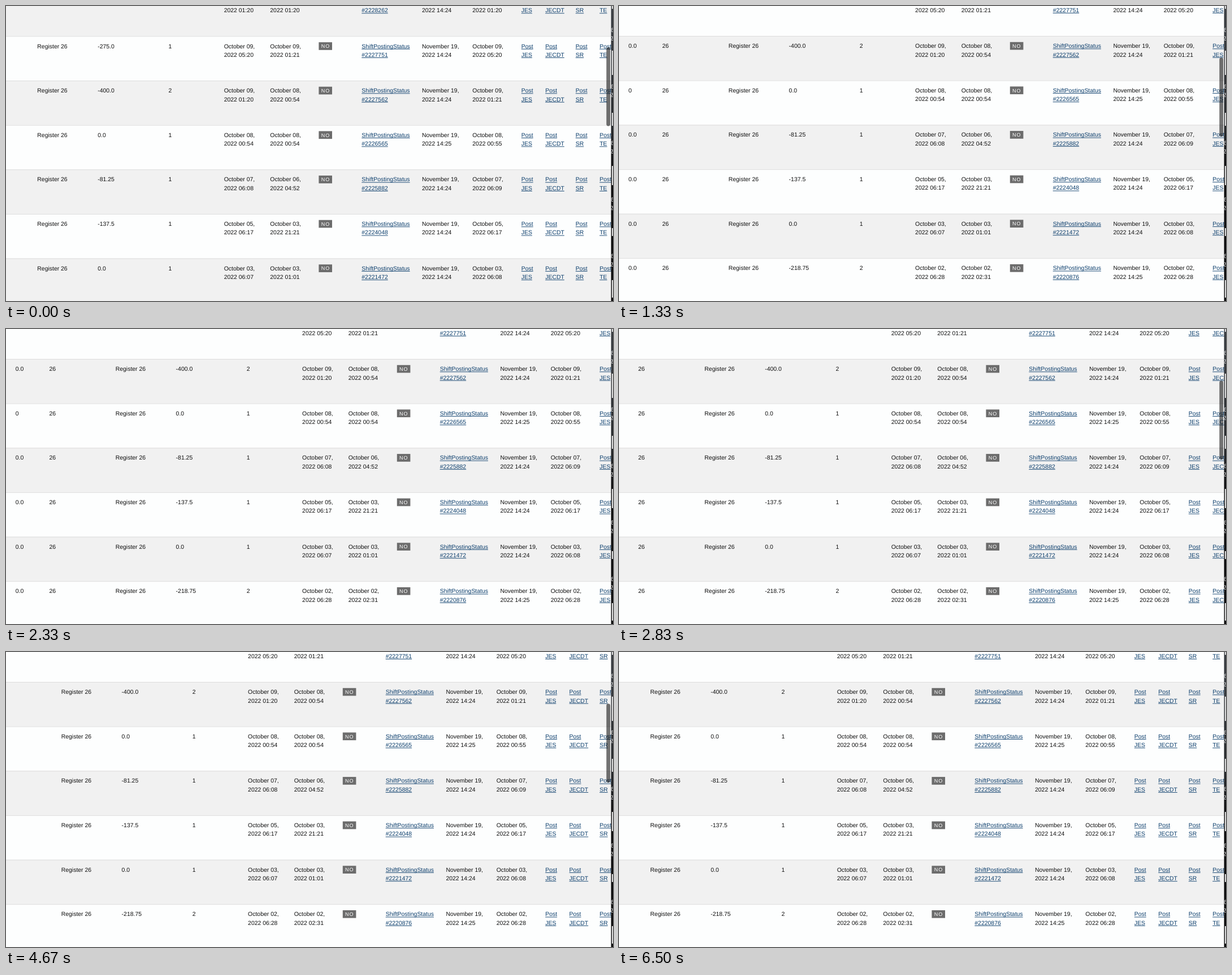
Write an HTML page with a canvas that moves like this. It is 1074 px wide and 522 px high and loops after 6.67 s.

```html
<!DOCTYPE html>
<html lang="en">
<head>
<meta charset="utf-8">
<title>Shift table</title>
<style>
  html, body { margin: 0; width: 100%; height: 100%; overflow: hidden; background: #fdfefe; }
  canvas { display: block; }
</style>
</head>
<body>
<canvas id="stage"></canvas>
<script>
const WIDTH = 1074, HEIGHT = 522, LOOP = 6670;
const ROW_HEIGHT = 78.64, FIRST_TOP = -24.6;
const FIRST_BASELINE = 20.5, LINE_HEIGHT = 15.35;
const FONT = '"Liberation Sans", Arial, sans-serif';
const INK = '#101010', LINK = '#0d3f6d';
const canvas = document.getElementById('stage');
const ratio = window.devicePixelRatio || 1;
canvas.width = WIDTH * ratio;
canvas.height = HEIGHT * ratio;
canvas.style.width = WIDTH + 'px';
canvas.style.height = HEIGHT + 'px';
const ctx = canvas.getContext('2d');
ctx.scale(ratio, ratio);

// difference | amount | count | start | end | status id | posted | updated
const rows = `
0.0|0.0|1|09, 01:20|09, 01:20|2228262|24|09, 01:20
0.0|-275.0|1|09, 05:20|09, 01:21|2227751|24|09, 05:20
0.0|-400.0|2|09, 01:20|08, 00:54|2227562|24|09, 01:21
0|0.0|1|08, 00:54|08, 00:54|2226565|25|08, 00:55
0.0|-81.25|1|07, 06:08|06, 04:52|2225882|24|07, 06:09
0.0|-137.5|1|05, 06:17|03, 21:21|2224048|24|05, 06:17
0.0|0.0|1|03, 06:07|03, 01:01|2221472|24|03, 06:08
0.0|-218.75|2|02, 06:28|02, 02:31|2220876|25|02, 06:28
`.trim().split('\n').map(line => line.split('|'));

// Each focus change scrolls the table at once and shows the scrollbar.
const views = [
  { start: 0, shift: 0, scroll: 0 },
  { start: 1330, shift: 138.4, scroll: 79 },
  { start: 2670, shift: 96, scroll: 79 },
  { start: 4330, shift: 42.4, scroll: 79 },
  { start: 5670, shift: 0, scroll: 79 }
];

function rect(x, y, w, h, color) {
  ctx.fillStyle = color;
  ctx.fillRect(x, y, w, h);
}

function text(value, x, y, color = INK, size = 10.45) {
  ctx.font = `${size}px ${FONT}`;
  ctx.fillStyle = color;
  ctx.fillText(value, x, y);
}

function cell(x, top, ...lines) {
  lines.forEach((line, i) => text(line, x, top + FIRST_BASELINE + i * LINE_HEIGHT));
}

function link(x, top, ...lines) {
  lines.forEach((line, i) => {
    const y = top + FIRST_BASELINE + i * LINE_HEIGHT;
    text(line, x, y, LINK);
    rect(x, y + 1.2, ctx.measureText(line).width, 0.9, LINK);
  });
}

function date(x, top, value) {
  const [day, time] = value.split(' ');
  cell(x, top, 'October ' + day, '2022 ' + time);
}

function badge(x, top) {
  rect(x, top + 10.1, 23.6, 13.7, '#6c6c6c');
  ctx.letterSpacing = '1px';
  text('NO', x + 4.3, top + 20.2, '#fff', 9);
  ctx.letterSpacing = '0px';
}

function drawRow(row, index, shift, scroll) {
  const [difference, amount, count, start, end, id, posted, updated] = row;
  const top = FIRST_TOP + index * ROW_HEIGHT - scroll;
  const edge = top - 0.7;
  rect(0, edge, WIDTH, ROW_HEIGHT + 1, index % 2 ? '#fdfefe' : '#f1f1f1');
  rect(0, edge, WIDTH, 1, '#dcdcdc');

  const at = x => x + shift;
  cell(at(-121.6), top, difference);
  cell(at(-62), top, '26');
  cell(at(55.3), top, 'Register 26');
  cell(at(162.2), top, amount);
  cell(at(287.4), top, count);
  date(at(385.7), top, start);
  date(at(467.3), top, end);
  badge(at(553.4), top);
  link(at(629.3), top, 'ShiftPostingStatus', '#' + id);
  cell(at(736), top, 'November 19,', '2022 14:' + posted);
  date(at(825.3), top, updated);
  link(at(911.8), top, 'Post', 'JES');
  link(at(954.2), top, 'Post', 'JECDT');
  link(at(1007.8), top, 'Post', 'SR');
  link(at(1050.2), top, 'Post', 'TE');
}

// Sliver of the dark window behind the right edge.
function drawEdge() {
  const shade = ctx.createLinearGradient(0, 0, 0, HEIGHT);
  shade.addColorStop(0, '#3a3e43');
  shade.addColorStop(0.4, '#25282b');
  shade.addColorStop(0.55, '#0c0c0d');
  shade.addColorStop(1, '#0c0c0d');
  rect(1070.6, 0, 4, HEIGHT, shade);
  for (const [y, h] of [[0, 5], [79, 43], [189, 23], [283, 34], [393, 14], [485, 31]]) {
    rect(1072, y, 2, h, '#dcdcdc');
  }
  ctx.save();
  ctx.beginPath();
  ctx.rect(1070.6, 0, 4, HEIGHT);
  ctx.clip();
  for (let y = 46; y < HEIGHT; y += 100) {
    text('6', 1070, y, '#e6e6e6');
    text('2', 1069, y + 15, '#e6e6e6');
  }
  ctx.restore();
}

function drawScrollbar(age, scroll) {
  const alpha = Math.min(1, Math.max(0, (750 - age) / 250));
  ctx.fillStyle = `rgba(0, 0, 0, ${0.55 * alpha})`;
  ctx.beginPath();
  ctx.roundRect(1062.3, scroll ? 91.5 : 73, 6.8, 139.5, 3.4);
  ctx.fill();
}

function draw(now) {
  const time = now % LOOP;
  const view = views.findLast(v => time >= v.start);
  ctx.textRendering = 'geometricPrecision';
  ctx.fontKerning = 'none';
  rows.forEach((row, i) => drawRow(row, i, view.shift, view.scroll));
  drawEdge();
  drawScrollbar(time - view.start, view.scroll);
}

const began = performance.now();
function tick() {
  draw(performance.now() - began);
  requestAnimationFrame(tick);
}
tick();
</script>
</body>
</html>
```
